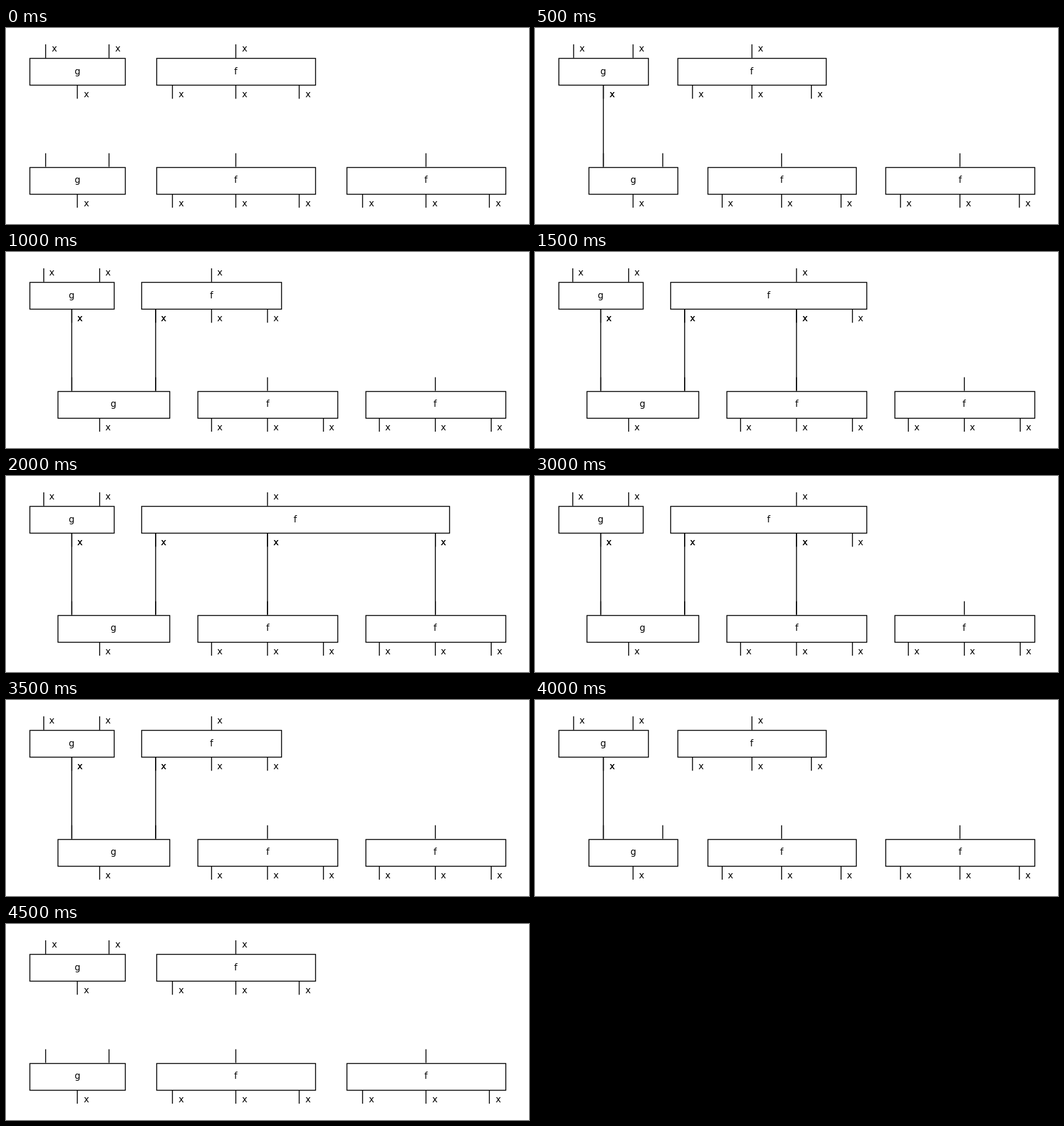
Recreate the animation shown at these times as an HTML page with a canvas. Size 800 by 300 pixels, loop 5000 ms.

```html
<!DOCTYPE html>
<html>
<head>
<meta charset="utf-8">
<style>
html, body { margin: 0; width: 100%; height: 100%; overflow: hidden; background: #fff; }
canvas { display: block; }
</style>
</head>
<body>
<canvas id="stage" width="800" height="300"></canvas>
<script>
const ctx = document.getElementById('stage').getContext('2d');
const LINKS = [1.5, 4.5, 8.5, 14.5];
const STEP = 500;
const STUB = 125 / 6;
const LEFT = 800 / 22;
let unit;

const toX = col => LEFT + col * unit;

function wire(col, y1, y2) {
  ctx.beginPath();
  ctx.moveTo(toX(col), y1);
  ctx.lineTo(toX(col), y2);
  ctx.stroke();
}

function wireLabel(col, baseline) {
  ctx.fillText('x', Math.round(toX(col + 0.2)), baseline);
}

// Box edges sit on pixel centres; wires keep their fractional places.
function box(name, start, end, y1, y2, baseline) {
  const left = Math.round(toX(start)) + 0.5;
  const right = Math.round(toX(end)) + 0.5;
  ctx.strokeRect(left, y1, right - left, y2 - y1);
  const middle = toX((start + end) / 2);
  ctx.fillText(name, Math.round(middle - ctx.measureText(name).width / 2), baseline);
}

function upperBox(name, start, end, inputs, outputs) {
  for (const col of inputs) {
    wire(col, 25, 25 + STUB);
    wireLabel(col, 36);
  }
  for (const col of outputs) {
    wire(col, 87.5, 87.5 + STUB);
    wireLabel(col, 106);
  }
  box(name, start, end, 46.5, 87.5, 71);
}

function lowerBox(name, start, end, inputs, outputs) {
  for (const col of inputs) wire(col, 212.5 - STUB, 212.5);
  for (const col of outputs) {
    wire(col, 275 - STUB, 275);
    wireLabel(col, 273);
  }
  box(name, start, end, 213.5, 254.5, 237);
}

function draw(linked) {
  const columns = 15 + Math.min(linked, 2);
  unit = (800 - 2 * LEFT) / columns;
  ctx.fillStyle = '#fff';
  ctx.fillRect(0, 0, 800, 300);
  ctx.fillStyle = ctx.strokeStyle = '#000';
  ctx.lineWidth = 100 / 72;
  ctx.font = '13.89px "DejaVu Sans", sans-serif';

  const end = [9, 9, 9, 11, 15][linked];
  const middle = linked > 2 ? 8.5 : 6.5;
  upperBox('g', 0, 3, [0.5, 2.5], [1.5]);
  upperBox('f', 4, end, [middle], [4.5, middle, end - 0.5]);

  const gStart = Math.min(linked, 1);
  const gEnd = columns - 12;
  lowerBox('g', gStart, gEnd, [gStart + 0.5, gEnd - 0.5], [gStart + 1.5]);
  for (const start of [columns - 11, columns - 5]) {
    lowerBox('f', start, start + 5, [start + 2.5], [0.5, 2.5, 4.5].map(d => start + d));
  }

  // Joined wires overlay their stubs and labels.
  for (const col of LINKS.slice(0, linked)) {
    wire(col, 87.5, 212.5);
    wireLabel(col, 106);
  }
}

function frame() {
  const step = Math.floor(performance.now() / STEP) % 10;
  draw(Math.min(step, 9 - step));
  requestAnimationFrame(frame);
}
frame();
</script>
</body>
</html>
```
